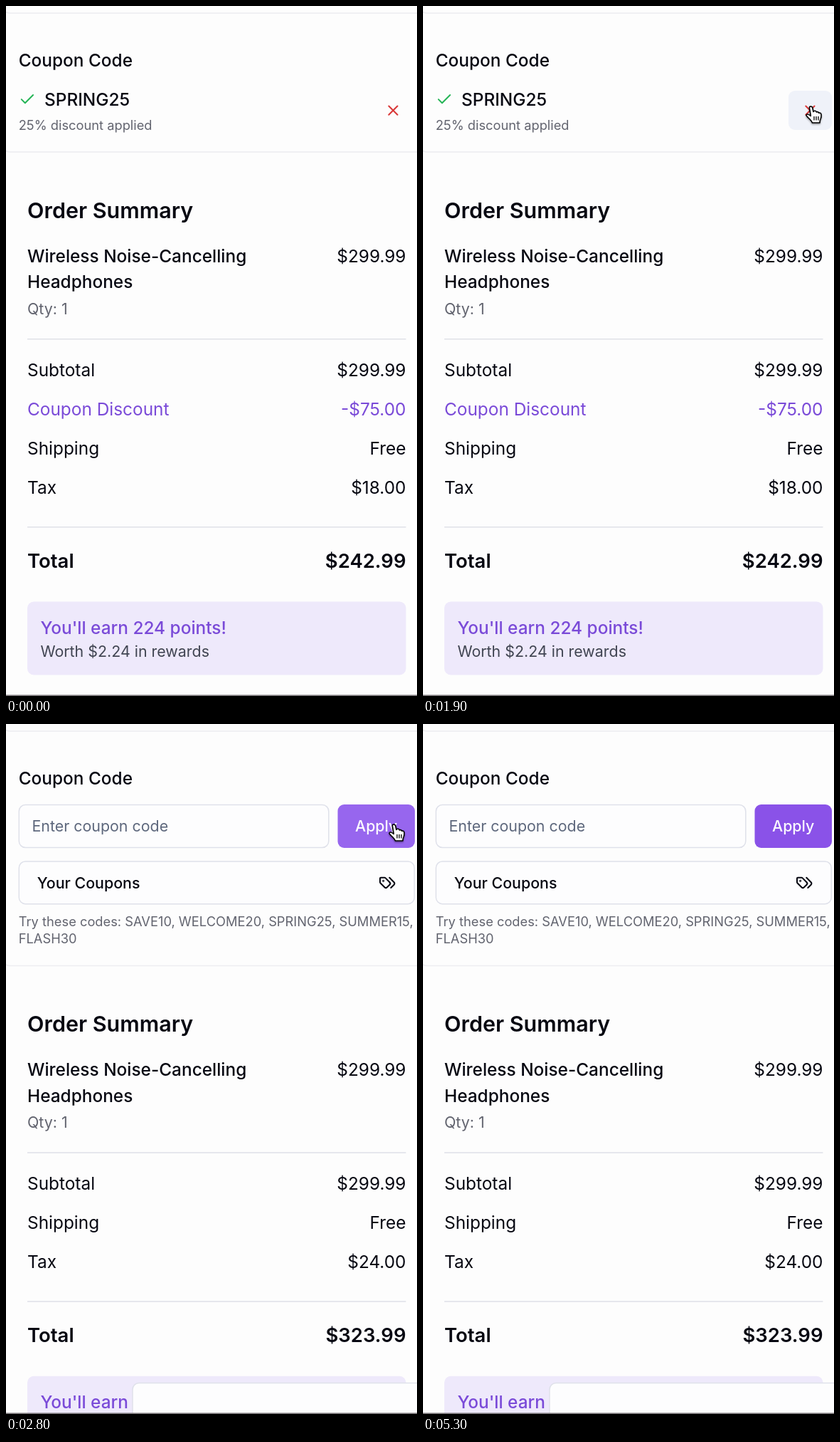
These frames come from a looping animation (578x969 px, 5400 ms). An HTML page:

```html
<!DOCTYPE html>
<html lang="en">
<head>
<meta charset="utf-8">
<title>Coupon removal</title>
<style>
  html, body { margin: 0; width: 100%; height: 100%; overflow: hidden; background: #fdfdfd; }
  svg { display: block; width: 100vw; height: 100vh; }
  text { font-family: Inter, "Liberation Sans", sans-serif; font-optical-sizing: none; white-space: pre; }
  .icon { fill: none; stroke-width: 2; stroke-linecap: round; stroke-linejoin: round; }
  .field { fill: #fdfdfe; stroke: #dfe1ea; stroke-width: 1.5; }
  .card { fill: none; stroke: #ededf1; stroke-width: 1.6; }
</style>
</head>
<body>
<svg id="stage" viewBox="0 0 578 969"></svg>
<script>
const LOOP = 5400;
const INK = '#060711', GRAY = '#62646f', PURPLE = '#7a4ad8';
const SM = 18.3, MD = 21.4, BASE = 24.4, LG = 27.5, XL = 30.5;
const LEFT = 30, RIGHT = 562.5;

// y is the middle of the capital letters
const label = (s, x, y, size = BASE, weight = 400, color = INK, anchor = 'start') =>
  `<text x="${x}" y="${(y + size * .364).toFixed(2)}" font-size="${size}" font-weight="${weight}" fill="${color}" text-anchor="${anchor}">${s}</text>`;
const box = (x, y, w, h, attrs) => `<rect x="${x}" y="${y}" width="${w}" height="${h}" rx="9" ${attrs}/>`;
const row = (name, value, y, size, weight, color) =>
  label(name, LEFT, y, size, weight, color) + label(value, RIGHT, y, size, weight, color, 'end');
const rule = y => `<path d="M${LEFT} ${y}H${RIGHT}" stroke="#dfe1e8" stroke-width="1.5"/>`;
const icon = (x, y, color, body) =>
  `<g class="icon" transform="translate(${x} ${y}) scale(1.018)" stroke="${color}">${body}</g>`;
const card = bottom => `<rect class="card" x="-6.5" y="${bottom - 400}" width="640" height="400" rx="12"/>`;

function summary(shift, discount, tax, total, points, worth) {
  const rows = [['Subtotal', '$299.99'], ['Shipping', 'Free'], ['Tax', tax]];
  if (discount) rows.splice(1, 0, ['Coupon Discount', discount, PURPLE]);
  const end = 511 + 55 * rows.length;
  return `<g transform="translate(0 ${shift})">` +
    label('Order Summary', LEFT, 287, XL, 600) +
    label('Wireless Noise-Cancelling', LEFT, 351, BASE, 500) +
    label('Headphones', LEFT, 387.6, BASE, 500) +
    label('$299.99', RIGHT, 351, BASE, 400, INK, 'end') +
    label('Qty: 1', LEFT, 425.3, MD, 400, GRAY) + rule(467.7) +
    rows.map(([name, value, color], i) => row(name, value, 511 + 55 * i, BASE, 400, color)).join('') +
    rule(end + .7) + row('Total', total, end + 47.5, LG, 600) +
    box(LEFT, end + 105.5, 532.5, 103, 'fill="#eee9fb"') +
    label(`You'll earn ${points} points!`, 48.4, end + 142, BASE, 500, PURPLE) +
    label(`Worth ${worth} in rewards`, 48.4, end + 175.6, MD, 400, '#414552') + '</g>';
}

const applied = card(205) +
  icon(17.7, 118.9, '#27b558', '<path d="M20 6 9 17l-5-5"/>') +
  label('SPRING25', 54, 131, BASE, 500) +
  label('25% discount applied', 17.7, 167.7, SM, 400, GRAY) +
  box(514, 119, 61, 55, 'id="hover" fill="#eff2f9"') +
  icon(532.2, 134.4, '#d93838', '<path d="M18 6 6 18M6 6l12 12"/>') +
  summary(0, '-$75.00', '$18.00', '$242.99', 224, '$2.24');

const removed = card(339.5) +
  box(18.3, 113.5, 435.5, 60, 'class="field"') +
  label('Enter coupon code', 36.4, 143.5, MD, 400, '#5d677c') +
  box(466.5, 113, 108.5, 61, 'id="apply"') +
  label('Apply', 520.7, 143.5, MD, 500, '#fbf9ff', 'middle') +
  box(18.3, 193, 556, 59.7, 'class="field"') +
  label('Your Coupons', 43.7, 222.8, MD, 500) +
  icon(524, 210.7, INK, `<path d="m15 5 6.3 6.3a2.4 2.4 0 0 1 0 3.4L17 19"/>
    <path d="M9.586 5.586A2 2 0 0 0 8.172 5H3a1 1 0 0 0-1 1v5.172a2 2 0 0 0 .586 1.414L8.29 18.29a2.426 2.426 0 0 0 3.42 0l3.58-3.58a2.426 2.426 0 0 0 0-3.42z"/>
    <circle cx="6.5" cy="9.5" r=".5"/>`) +
  label('Try these codes: SAVE10, WELCOME20, SPRING25, SUMMER15,', 17.7, 277.3, SM, 400, GRAY) +
  label('FLASH30', 17.7, 301.7, SM, 400, GRAY) +
  summary(134.3, '', '$24.00', '$323.99', 299, '$2.99') +
  box(0, 0, 500, 120, 'id="toast" class="field"');

const arrow = `<path d="M0 0V20.5L4.6 16.3 8.2 25 12 23.4 8.4 14.9H14.6Z" fill="#000" stroke="#fff" stroke-width="1.5"/>`;
const hand = `<g transform="translate(-8.5 -2)" stroke-linejoin="round">
  <path d="M8.2 14.5 6.6 5Q6 2 8.2 2T10.9 4.5L12 9.5Q12.6 8 14.4 8.3 16 8.6 16.3 10 18.4 9 19.8 11.2 22.5 10.6 23 13.5 23.4 17 22 20 21 22 21 25H10.5Q9.5 22.5 7 20 4.5 17.8 2.3 15.2 1.6 13.4 3.4 13 5.4 12.8 8.2 15.5Z" fill="#fff" stroke="#000" stroke-width="1.6"/>
  <path d="M13 16v5.5M16 16v5.5M19 16v5.5" stroke="#000" stroke-width="1.3"/></g>`;

const stage = document.getElementById('stage');
stage.innerHTML = `<defs><filter id="shade" x="-50%" y="-50%" width="200%" height="200%">
    <feDropShadow dx="0" dy="1.5" stdDeviation="1.3" flood-opacity=".4"/></filter></defs>
  <rect width="578" height="969" fill="#fdfdfd"/>` + card(10) +
  label('Coupon Code', 17.7, 76, BASE, 500) +
  `<g id="applied">${applied}</g><g id="removed">${removed}</g>
  <rect y="967.4" width="578" height="1.6" fill="#777376"/>
  <g id="cursor" filter="url(#shade)"><g id="arrow">${arrow}</g><g id="hand">${hand}</g></g>`;

const el = id => document.getElementById(id);
const show = (id, on) => el(id).setAttribute('display', on ? 'inline' : 'none');
const ramp = (t, from, to) => Math.min(1, Math.max(0, (t - from) / (to - from)));
const mix = (a, b, p) => a + (b - a) * p;

function draw(t) {
  const isRemoved = t >= 2100;
  show('applied', !isRemoved);
  show('removed', isRemoved);

  // pointer travels to the remove button, then rests there
  const p = ramp(t, 900, 1300);
  const x = mix(490, 545.5, 1 - (1 - p) ** 1.25), y = mix(189, 141, p);
  const over = x > 514 && y < 174;
  show('cursor', t >= 700 && t < 4500);
  show('arrow', !over);
  show('hand', over);
  el('cursor').setAttribute('transform', `translate(${x} ${y})`);
  el('hover').setAttribute('opacity', ramp(t, 1050, 1250));

  const lit = ramp(t, 2150, 2350) - ramp(t, 4450, 4650);
  const rgb = [mix(138, 151, lit), mix(82, 102, lit), mix(232, 238, lit)].map(Math.round);
  el('apply').setAttribute('fill', `rgb(${rgb})`);

  const rise = ramp(t, 2100, 2400);
  show('toast', rise > 0);
  el('toast').setAttribute('transform', `translate(178 ${925.5 + 44 * (1 - rise) ** 2})`);
}

function tick(now) {
  draw(Math.floor(now % LOOP / 100) * 100);
  requestAnimationFrame(tick);
}
draw(0);
requestAnimationFrame(tick);
</script>
</body>
</html>
```
